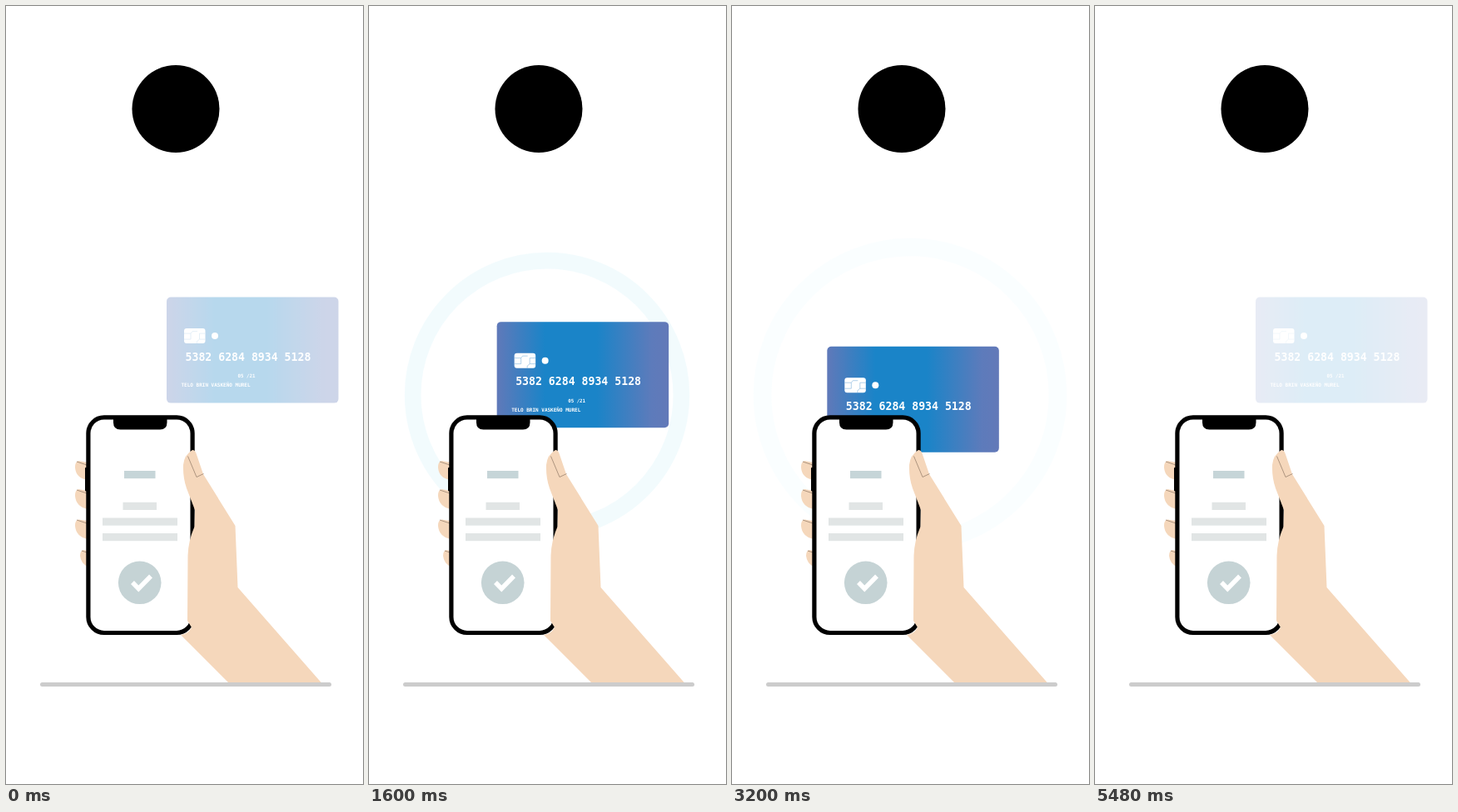
Animation, 429 px wide and 934 px high, one loop 5520 ms. Source, as an HTML page:

```html
<!DOCTYPE html>
<html lang="es">
<head>
<meta charset="utf-8">
<title>Contactless payment</title>
<style>
  html, body { margin: 0; width: 100%; height: 100%; overflow: hidden; background: #fff; }
  svg { display: block; width: 100%; height: 100%; }
  text { font-family: "DejaVu Sans Mono", "Noto Sans Mono", monospace; font-weight: bold; fill: #fff; }
  .ring { fill: none; stroke: #9be1f1; }
  .skin { fill: #f5d7bb; }
  .crease { fill: none; stroke: #8f7765; stroke-width: .7; }
</style>
</head>
<body>
<svg viewBox="0 0 429 934">
  <defs>
    <linearGradient id="cardFill">
      <stop offset="0" stop-color="#6079b9"/>
      <stop offset=".28" stop-color="#1a84c8"/>
      <stop offset=".58" stop-color="#1a84c8"/>
      <stop offset=".9" stop-color="#5d7bbb"/>
      <stop offset="1" stop-color="#6379b8"/>
    </linearGradient>
  </defs>

  <circle cx="204" cy="123.5" r="52.5"/>

  <circle class="ring" cx="214" cy="467"/>
  <circle class="ring" cx="214" cy="467"/>
  <circle class="ring" cx="214" cy="467"/>

  <g id="card">
    <rect width="206.5" height="127" rx="5" fill="url(#cardFill)"/>
    <rect x="21" y="37.5" width="25.5" height="18" rx="3" fill="#fff"/>
    <path d="M21 43.5h8v7h-8M46.5 43.5h-7v7h7M29 43.5l2-2.5h6M39.5 50.5l-3 2.5v2.5"
          fill="none" stroke="#7fb2dc" stroke-width=".6"/>
    <circle cx="58" cy="46.5" r="4" fill="#fff"/>
    <text x="22.5" y="76" font-size="13.2">5382 6284 8934 5128</text>
    <text x="85.5" y="96.5" font-size="5.8">05 /21</text>
    <text x="17.5" y="107.5" font-size="6">TELO BRIN VASKEÑO MUREL</text>
  </g>

  <g class="skin">
    <path d="M98 548L87 546Q83 547 83 554Q84 567 98 569Z"/>
    <path d="M98 582L87 580Q83 581 83 588Q84 601 98 604Z"/>
    <path d="M98 618L87 616.5Q83 617 83 624Q84 637 98 640Z"/>
    <path d="M98 654L93 653Q89 654 89 660Q90 669 98 673Z"/>
  </g>
  <path class="crease" d="M85 547L97 551M85 581L97 585M85 617L97 621M91 654L97 656"/>

  <rect x="95" y="554" width="4" height="28.5" rx="1"/>
  <rect x="98.9" y="493.9" width="125.2" height="258.6" rx="19" fill="#fff" stroke="#000" stroke-width="5.2"/>
  <path d="M129 493H193.5V500Q193.5 508.5 185 508.5H137.5Q129 508.5 129 500Z"/>

  <rect x="142" y="558" width="37.5" height="9.2" fill="#c6d5d8"/>
  <g fill="#e1e5e5">
    <rect x="140.5" y="595.8" width="40.5" height="9.2"/>
    <rect x="116" y="614.5" width="90" height="9.2"/>
    <rect x="116" y="633" width="90" height="9.2"/>
  </g>
  <circle cx="160.7" cy="692.3" r="25.8" fill="#c5d3d5"/>
  <path d="M152 692L159.3 699.5L174 684.5" fill="none" stroke="#fff" stroke-width="5.5"/>

  <path class="skin" d="M224 533Q214 539 213 551Q212.500 566 217 579L227 605L226.500 625
    Q219 642 218.500 660L218 738L223 746Q219 754 210 755L268 813H379.500L278.500 698L275.500 624
    L237 562L228.500 537Q227 533 224 533Z"/>
  <path class="crease" d="M218.5 540.5L229 565.5L237.5 561.5"/>

  <rect x="41" y="812" width="350" height="5" rx="2.5" fill="#ccc"/>
</svg>
<script>
  const LOOP = 5520, STEP = 40;
  const SLIDE_END = 3270, RESET = 5120;
  const RING_STARTS = [0, 1440, 3020];
  const RING_LIFE = 1850, RING_SPEED = 0.107;
  const card = document.getElementById("card");
  const rings = document.querySelectorAll(".ring");

  const clamp = x => Math.min(1, Math.max(0, x));
  const progress = (t, from, to) => clamp((t - from) / (to - from));

  function cardOpacity(t) {
    if (t < 3480) return 0.31 + 0.69 * progress(t, 0, 975);
    if (t < RESET) return 1 - progress(t, 3480, RESET);
    return 0.14 * progress(t, RESET, 5480);
  }

  function drawCard(t) {
    const slide = t < RESET ? progress(t, 0, SLIDE_END) : 0;
    card.setAttribute("transform", `translate(${193 - 80.4 * slide} ${349.6 + 60.4 * slide})`);
    card.setAttribute("opacity", cardOpacity(t));
  }

  function drawRing(ring, age) {
    const outer = Math.max(0, age * RING_SPEED);
    const width = outer * 0.115;
    ring.setAttribute("r", outer - width / 2);
    ring.setAttribute("stroke-width", width);
    ring.setAttribute("opacity", clamp(1 - age / RING_LIFE));
  }

  function draw() {
    const t = Math.floor(performance.now() % LOOP / STEP) * STEP;
    drawCard(t);
    rings.forEach((ring, i) => drawRing(ring, t - RING_STARTS[i]));
    requestAnimationFrame(draw);
  }
  draw();
</script>
</body>
</html>
```
